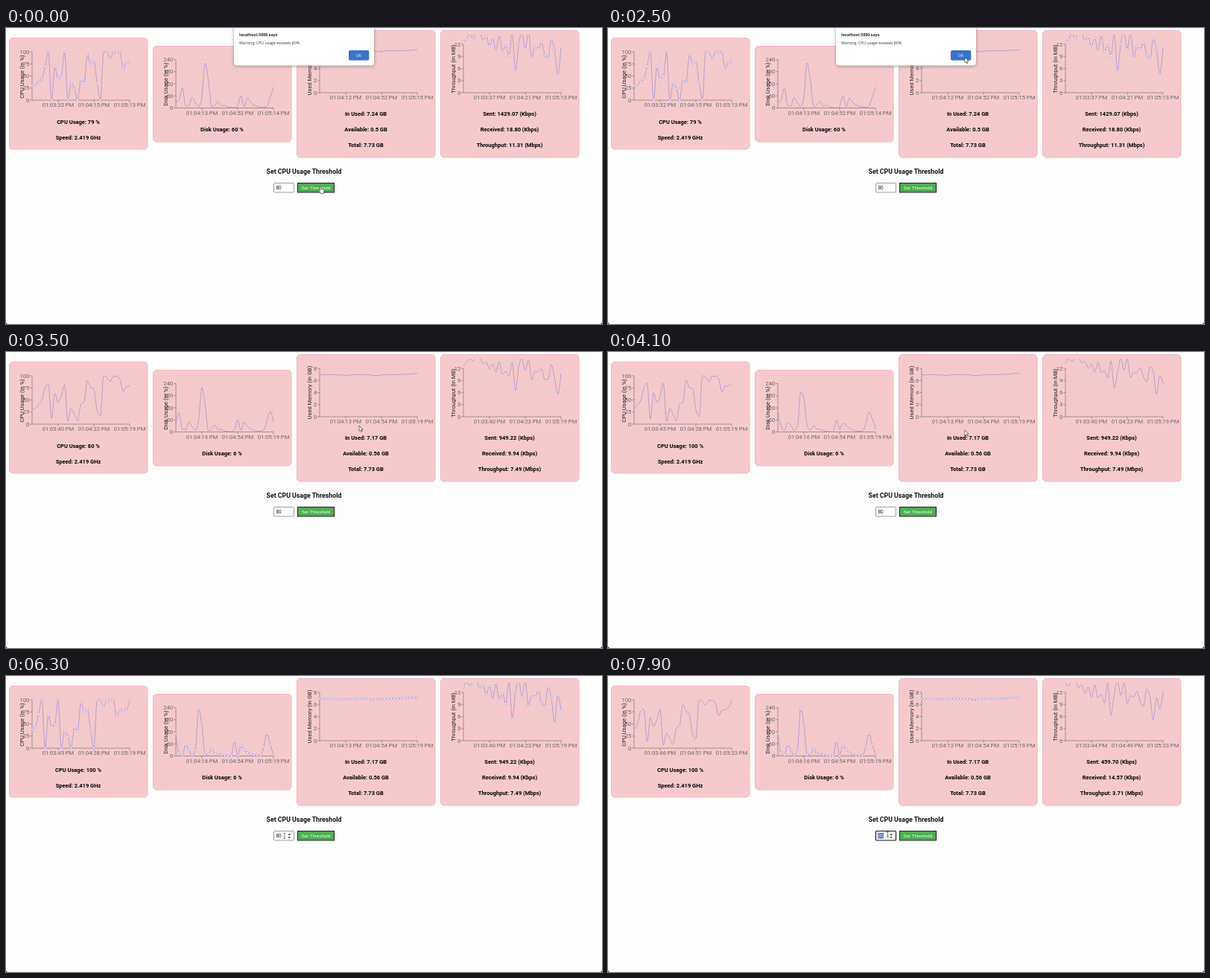
Recreate the animation shown at these times as an HTML page. Size 800 by 398 pixels, loop 8 s.

```html
<!DOCTYPE html>
<html lang="en">
<head>
<meta charset="utf-8">
<title>System monitor</title>
<style>
  html, body { margin: 0; width: 100%; height: 100%; overflow: hidden; background: #fdfdfd; }
  svg { display: block; position: absolute; left: 0; top: 0; }
  text { font-family: Roboto, "Liberation Sans", sans-serif; font-size: 7.6px; white-space: pre; }
  .card { fill: #f6cacc; stroke: #f6b3c1; stroke-width: 1; }
  .grid { stroke: #ccc; stroke-width: .55; stroke-dasharray: 1.45 1.45; }
  .axis { stroke: #666; stroke-width: .55; }
  .tick { fill: #666; }
  .name { fill: #222; text-anchor: middle; }
  .info { font-weight: 700; font-size: 7.5px; text-anchor: middle; }
  .curve { fill: none; stroke: #8884d8; stroke-width: .6; }
  .dots { fill: #fff; stroke: #8884d8; stroke-width: .5; }
  .form { font: 6.4px "Liberation Sans", Arial, sans-serif; }
  .alert text { font-family: "Open Sans", "Noto Sans", sans-serif; }
  .alert { filter: drop-shadow(0 1px 2px rgba(0,0,0,.35)); }
</style>
</head>
<body>
<svg id="stage" width="800" height="398" viewBox="0 0 800 398"></svg>
<script>
const LOOP = 8000, MORPH = 1500, CLOSE = 3000, SELECT = 6900;
const POINTS = 31, WIDTH = 131, HEIGHT = 65, STEP = WIDTH / (POINTS - 1);
const FROZEN = 0.13;   // progress of the morphs held up by the alert
const stage = document.getElementById('stage');

function add(parent, tag, attrs = {}, text) {
  const el = document.createElementNS('http://www.w3.org/2000/svg', tag);
  for (const k in attrs) el.setAttribute(k, attrs[k]);
  if (text !== undefined) el.textContent = text;
  parent.appendChild(el);
  return el;
}
const mix = (a, b, p) => a + (b - a) * p;
const show = (el, on) => el.setAttribute('visibility', on ? 'visible' : 'hidden');
const lastBefore = (list, t) => list.filter(s => s.at <= t).pop();

// CSS "ease", cubic-bezier(.25, .1, .25, 1)
function ease(x) {
  const bez = (a, b, u) => 3 * a * u * (1 - u) ** 2 + 3 * b * u * u * (1 - u) + u ** 3;
  let lo = 0, hi = 1;
  for (let i = 0; i < 22; i++) {
    const mid = (lo + hi) / 2;
    if (bez(.25, .25, mid) < x) lo = mid; else hi = mid;
  }
  return bez(.1, 1, lo);
}

// Monotone cubic through evenly spaced points
function monotone(ys, x0) {
  const n = ys.length, s = [], m = [];
  for (let i = 0; i < n - 1; i++) s.push((ys[i + 1] - ys[i]) / STEP);
  for (let i = 1; i < n - 1; i++) {
    const a = s[i - 1], b = s[i];
    m[i] = (Math.sign(a) + Math.sign(b)) * Math.min(Math.abs(a), Math.abs(b), Math.abs(a + b) / 4);
  }
  m[0] = (3 * s[0] - m[1]) / 2;
  m[n - 1] = (3 * s[n - 2] - m[n - 2]) / 2;
  const f = v => v.toFixed(2), h = STEP / 3;
  let d = `M${f(x0)},${f(ys[0])}`;
  for (let i = 0; i < n - 1; i++) {
    const x = x0 + i * STEP;
    d += `C${f(x + h)},${f(ys[i] + m[i] * h)} ${f(x + 2 * h)},${f(ys[i + 1] - m[i + 1] * h)} ${f(x + STEP)},${f(ys[i + 1])}`;
  }
  return d;
}

// Memory use: nearly flat, two small dips, a slow climb at the end
const memory = Array.from({ length: 33 }, (_, i) => {
  const dip = c => Math.exp(-((i - c) ** 2) / 1.6);
  return 6.95 + .03 * Math.sin(i * 1.7) - .14 * dip(9) - .19 * dip(18.5) + .22 / (1 + Math.exp(28.5 - i));
});

// steps: start time, first point shown, axis times, info lines
const charts = [
  {
    card: [4, 13, 150], x: 35, y: 32, max: 100, name: 'CPU Usage (in %)', nameAt: [24.2, 65.5], info: 128.8,
    data: [30, 31, 39, 44, 70, 100, 0, 68, 44, 49, 100, 0, 34, 24, 0, 42, 36, 94, 75, 80, 35, 0, 100, 99, 86, 99, 99, 99, 65, 78, 79, 80, 100, 100],
    steps: [
      { at: 0, shift: 0, times: ['03:32', '04:15', '05:13'], lines: ['CPU Usage: 79 %', 'Speed: 2.419 GHz'] },
      { at: 3280, shift: 1, times: ['03:40', '04:22', '05:19'], lines: ['CPU Usage: 80 %', 'Speed: 2.419 GHz'] },
      { at: 3900, shift: 2, times: ['03:45', '04:28', '05:19'], lines: ['CPU Usage: 100 %', 'Speed: 2.419 GHz'] },
      { at: 7670, shift: 3, times: ['03:46', '04:51', '05:23'], lines: ['CPU Usage: 100 %', 'Speed: 2.419 GHz'] }
    ]
  },
  {
    card: [197, 24, 129], x: 228, y: 42.5, max: 240, name: 'Disk Usage (in %)', nameAt: [216.9, 75.5], info: 139.3, frozen: true,
    data: [28, 31, 110, 14, 4, 55, 28, 4, 30, 232, 157, 6, 10, 37, 10, 14, 5, 3, 1, 1, 70, 0, 52, 30, 15, 10, 4, 3, 4, 45, 110, 57, 6],
    steps: [
      { at: 0, shift: 1, times: ['04:13', '04:52', '05:14'], lines: ['Disk Usage: 60 %'] },
      { at: 3305, shift: 2, times: ['04:16', '04:54', '05:19'], lines: ['Disk Usage: 6 %'] }
    ]
  },
  {
    card: [390, 3, 171], x: 421, y: 22, max: 8, name: 'Used Memory (in GB)', nameAt: [410.4, 54.5], info: 118.2, frozen: true,
    data: memory,
    steps: [
      { at: 0, shift: 1, times: ['04:12', '04:52', '05:15'], lines: ['In Used: 7.24 GB', 'Available: 0.5 GB', 'Total: 7.73 GB'] },
      { at: 3305, shift: 2, times: ['04:13', '04:54', '05:19'], lines: ['In Used: 7.17 GB', 'Available: 0.56 GB', 'Total: 7.73 GB'] }
    ]
  },
  {
    card: [583, 3, 171], x: 614, y: 22, max: 12, name: 'Throughput (in MB)', nameAt: [603.4, 55], info: 118.2,
    data: [12.6, 13.3, 14.6, 13.5, 15, 15, 13, 13.9, 11.6, 13.5, 10.5, 14.2, 10.3, 11.6, 9.2, 14.8, 5.5, 12, 15, 10.9, 15, 8.7, 11.4, 10.9, 12.4, 9.4, 8.5, 13.3, 10.7, 4.6, 11.3, 7.5, 12.8],
    steps: [
      { at: 0, shift: 0, times: ['03:37', '04:21', '05:13'], lines: ['Sent: 1429.07 (Kbps)', 'Received: 18.80 (Kbps)', 'Throughput: 11.31 (Mbps)'] },
      { at: 3305, shift: 1, times: ['03:40', '04:23', '05:19'], lines: ['Sent: 949.22 (Kbps)', 'Received: 9.94 (Kbps)', 'Throughput: 7.49 (Mbps)'] },
      { at: 6940, shift: 2, times: ['03:44', '04:49', '05:23'], lines: ['Sent: 459.70 (Kbps)', 'Received: 14.57 (Kbps)', 'Throughput: 3.71 (Mbps)'] }
    ]
  }
];

const clip = add(add(stage, 'defs'), 'clipPath', { id: 'plot' });
add(clip, 'rect', { x: 0, y: 9, width: 800, height: 160 });

function line(parent, cls, x1, y1, x2, y2) {
  add(parent, 'line', { class: cls, x1, y1, x2, y2 });
}

function buildChart(c) {
  const [cx, cy, ch] = c.card, { x, y } = c, bottom = y + HEIGHT, right = x + WIDTH;
  const tickX = [8, 19, 30].map(i => x + i * STEP);
  add(stage, 'rect', { class: 'card', x: cx + .5, y: cy + .5, width: 185.5, height: ch - .5, rx: 4.5 });
  for (let i = 0; i < 5; i++) line(stage, 'grid', x, y + i * HEIGHT / 4, right, y + i * HEIGHT / 4);
  for (const tx of [x, ...tickX]) line(stage, 'grid', tx, y, tx, bottom);
  line(stage, 'axis', x, bottom, right, bottom);
  line(stage, 'axis', x, y, x, bottom);
  for (let i = 0; i < 5; i++) {
    const ty = bottom - i * HEIGHT / 4;
    line(stage, 'axis', x - 3, ty, x, ty);
    add(stage, 'text', { class: 'tick', x: x - 3.8, y: ty + 2.7, 'text-anchor': 'end' }, c.max * i / 4);
  }
  c.timeTexts = tickX.map(tx => {
    line(stage, 'axis', tx, bottom, tx, bottom + 3);
    return add(stage, 'text', { class: 'tick', x: tx, y: bottom + 9.2, 'text-anchor': 'middle' });
  });
  const [nx, ny] = c.nameAt;
  add(stage, 'text', { class: 'name', transform: `translate(${nx} ${ny}) rotate(-90)` }, c.name);
  const plot = add(stage, 'g', { 'clip-path': 'url(#plot)' });
  c.curve = add(plot, 'path', { class: 'curve' });
  c.dots = add(plot, 'g', { class: 'dots' });
  c.circles = Array.from({ length: POINTS }, (_, i) => add(c.dots, 'circle', { cx: x + i * STEP, r: 1.4 }));
  c.infoTexts = c.steps[0].lines.map((_, i) =>
    add(stage, 'text', { class: 'info', x: cx + 93, y: c.info + i * 21 }));
}

function drawChart(c, t) {
  const step = lastBefore(c.steps, t);
  const held = c.frozen && t < CLOSE;
  let p = 1;
  if (held) p = FROZEN;
  else if (step.at > 0 && t < step.at + MORPH) p = ease((t - step.at) / MORPH);
  const from = Math.max(0, step.shift - 1);
  const ys = Array.from({ length: POINTS }, (_, i) =>
    c.y + HEIGHT * (1 - mix(c.data[from + i], c.data[step.shift + i], p) / c.max));
  c.curve.setAttribute('d', monotone(ys, c.x));
  show(c.dots, p === 1);
  c.circles.forEach((dot, i) => dot.setAttribute('cy', ys[i].toFixed(2)));
  if (c.current === step) return;
  c.current = step;
  c.timeTexts.forEach((el, i) => el.textContent = `01:${step.times[i]} PM`);
  c.infoTexts.forEach((el, i) => el.textContent = step.lines[i]);
}

charts.forEach(buildChart);

// Threshold form
add(stage, 'text', { x: 400, y: 196, 'text-anchor': 'middle', style: 'font-weight:700;font-size:8.75px', fill: '#111' }, 'Set CPU Usage Threshold');
const box = add(stage, 'rect', { x: 359.5, y: 208.5, width: 27, height: 12.5, rx: 1, fill: '#fff' });
const mark = add(stage, 'rect', { x: 362.2, y: 211, width: 7.6, height: 7.4, fill: '#3b62c4' });
const value = add(stage, 'text', { class: 'form', x: 362.5, y: 217.1 }, '80');
const spinner = add(stage, 'path', { d: 'M378.3 213.9l2-2.4 2 2.4zM378.3 215.9l2 2.4 2-2.4z', fill: '#555' });
add(stage, 'rect', { x: 391.5, y: 208.5, width: 49, height: 12.5, fill: '#4caf50', stroke: '#222' });
add(stage, 'text', { class: 'form', x: 416, y: 217.1, 'text-anchor': 'middle', fill: '#fff', style: 'font-size:6.2px' }, 'Set Threshold');

// Alert
const alertBox = add(stage, 'g', { class: 'alert' });
add(alertBox, 'rect', { x: 306, y: -8, width: 188, height: 58.5, rx: 4, fill: '#fff' });
add(alertBox, 'text', { x: 313, y: 10.6, style: 'font-weight:700;font-size:5.4px', fill: '#222' }, 'localhost:3000 says');
add(alertBox, 'text', { x: 313, y: 22.2, style: 'font-size:5.2px', fill: '#333' }, 'Warning: CPU usage exceeds 80%');
add(alertBox, 'rect', { x: 460, y: 30, width: 27.3, height: 13.5, rx: 2, fill: '#3873c8' });
add(alertBox, 'text', { x: 473.6, y: 38.6, 'text-anchor': 'middle', style: 'font-size:5.2px', fill: '#fff' }, 'OK');

// Rounded window corners
add(stage, 'path', { d: 'M0 395v3h3a3 3 0 0 1-3-3zM800 395v3h-3a3 3 0 0 0 3-3z', fill: '#111' });

// Pointer shapes, drawn from their hot spot
const pointers = {
  arrow: add(stage, 'path', { d: 'M0 0V7.4L1.7 5.9L2.9 8.6L4.1 8.1L2.9 5.4H5.2Z', fill: '#fff', stroke: '#222', 'stroke-width': .6 }),
  hand: add(stage, 'path', {
    d: 'M-.8 .7a.8.8 0 0 1 1.6 0V3.6L3.6 4.2Q4.7 4.5 4.6 5.7L4 8.2V9.4H-.6V8.4L-3 5.6Q-3 4.4-1.8 4.9L-.8 5.7Z',
    fill: '#fff', stroke: '#222', 'stroke-width': .6
  }),
  beam: add(stage, 'path', { d: 'M-1.5-3.5H-.4L0-3.2L.4-3.5H1.5M0-3.2V3.2M-1.5 3.5H-.4L0 3.2L.4 3.5H1.5', fill: 'none', stroke: '#222', 'stroke-width': .6 })
};
const path = [
  [0, 422.5, 213], [900, 422.5, 213], [1300, 420.8, 207.2], [1500, 422, 203], [2200, 479, 39], [2500, 479, 39.3],
  [3050, 479, 40], [3450, 474, 99], [3600, 474, 99], [4300, 480, 106.5], [5000, 480, 106.5],
  [5900, 374, 215], [6300, 374, 215], [6700, 375.5, 213], [8000, 375.5, 213]
];

function pointerAt(t) {
  const i = path.findIndex(k => k[0] > t), a = path[i - 1], b = path[i];
  const u = (t - a[0]) / (b[0] - a[0]), p = u * u * (3 - 2 * u);
  return [mix(a[1], b[1], p), mix(a[2], b[2], p)];
}

function drawPointer(t) {
  const [x, y] = pointerAt(t);
  const inRow = y > 207 && y < 222;
  const overInput = inRow && x > 359 && x < 387;
  const kind = overInput ? 'beam' : inRow && x > 391 && x < 441 ? 'hand' : 'arrow';
  for (const k in pointers) show(pointers[k], k === kind);
  pointers[kind].setAttribute('transform', `translate(${x.toFixed(2)} ${y.toFixed(2)})`);
  show(spinner, overInput);
}

function draw(t) {
  charts.forEach(c => drawChart(c, t));
  show(alertBox, t < CLOSE);
  const selected = t >= SELECT;
  box.setAttribute('stroke', selected ? '#111' : '#767676');
  box.setAttribute('stroke-width', selected ? 1.1 : .7);
  value.setAttribute('fill', selected ? '#fff' : '#111');
  show(mark, selected);
  drawPointer(t);
}

function tick() {
  draw(performance.now() % LOOP);
  requestAnimationFrame(tick);
}
tick();
</script>
</body>
</html>
```
